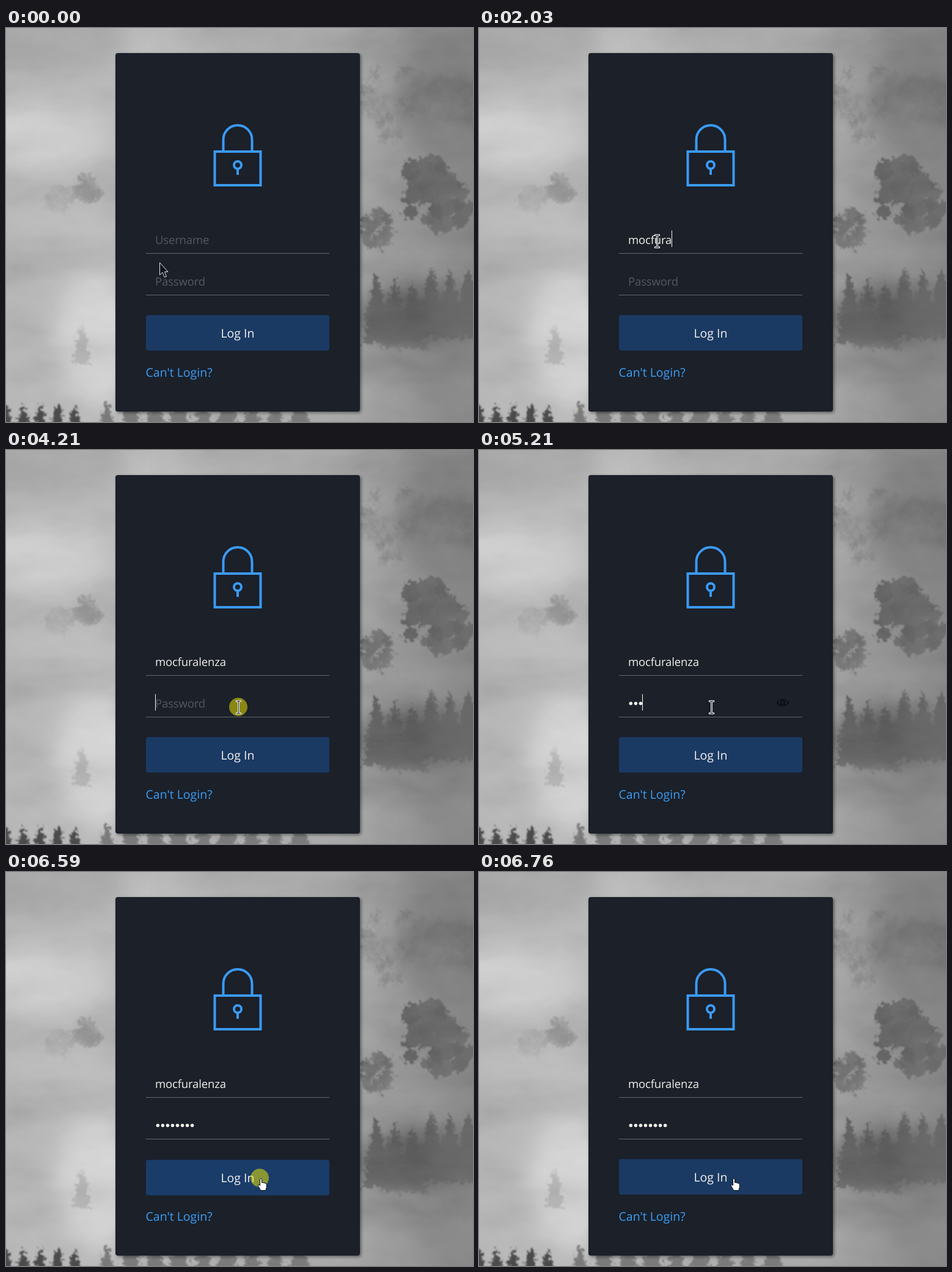
Recreate the animation shown at these times as an HTML page. Size 764 px wide and 644 px high, loop 8000 ms.

```html
<!DOCTYPE html>
<html lang="en">
<head>
<meta charset="utf-8">
<title>Login form</title>
<style>
  html, body { margin: 0; width: 100%; height: 100%; overflow: hidden; background: #aaa; }
  svg { display: block; }
  text { font-family: "Open Sans", "Noto Sans", sans-serif; font-size: 18.5px; letter-spacing: -0.15px; text-rendering: geometricPrecision; }
  .wide { font-size: 19.5px; letter-spacing: 0; }
  .hint { fill: #55595d; }
  .value { fill: #f0efea; white-space: pre; }
</style>
</head>
<body>
<svg id="stage" width="764" height="644" viewBox="0 0 764 644">
  <defs>
    <linearGradient id="sky">
      <stop offset="0" stop-color="#b3b3b3"/>
      <stop offset=".25" stop-color="#bababa"/>
      <stop offset=".75" stop-color="#a0a0a0"/>
      <stop offset="1" stop-color="#7c7c7c"/>
    </linearGradient>
    <filter id="mist" filterUnits="userSpaceOnUse" x="-100" y="-100" width="964" height="844">
      <feGaussianBlur stdDeviation="18"/>
    </filter>
    <filter id="wisps" x="0" y="0" width="100%" height="100%">
      <feTurbulence type="fractalNoise" baseFrequency=".007 .014" numOctaves="4" seed="8"/>
      <feColorMatrix values="1 0 0 0 0  1 0 0 0 0  1 0 0 0 0  0 0 0 0 .16"/>
    </filter>
    <filter id="leaf" filterUnits="userSpaceOnUse" x="-40" y="-40" width="844" height="724">
      <feTurbulence type="fractalNoise" baseFrequency=".14" numOctaves="3" seed="4"/>
      <feDisplacementMap in="SourceGraphic" scale="20" xChannelSelector="R" yChannelSelector="G"/>
      <feGaussianBlur stdDeviation="1"/>
    </filter>
    <filter id="shade" filterUnits="userSpaceOnUse" x="160" y="20" width="440" height="624">
      <feGaussianBlur stdDeviation="2.5"/>
    </filter>
  </defs>

  <rect width="764" height="644" fill="url(#sky)"/>
  <g id="far" filter="url(#mist)"></g>
  <g id="trees" filter="url(#leaf)"></g>
  <g id="near" filter="url(#mist)"></g>
  <rect width="764" height="644" filter="url(#wisps)"/>
  <g id="front" filter="url(#leaf)"></g>

  <rect x="181" y="43" width="400" height="586" rx="4" opacity=".45" filter="url(#shade)"/>
  <rect x="179" y="41" width="400" height="586" rx="4" fill="#1b2029"/>

  <g fill="none" stroke="#3a9af4" stroke-width="4">
    <rect x="341.5" y="202" width="75" height="55"/>
    <path d="M355.5 201V182.500a23.500 23.500 0 0 1 47 0V201"/>
    <circle cx="379" cy="224" r="6"/>
    <path d="M379 229V240"/>
  </g>

  <path d="M229 368.5H529M229 436.5H529" stroke="#696569"/>
  <text id="userHint" class="hint" x="244" y="353">Username</text>
  <text id="user" class="value" x="244" y="353"></text>
  <text id="passHint" class="hint" x="244" y="421">Password</text>
  <g id="dots" fill="#f0efea"></g>
  <g id="eye" fill="none" stroke="#050608" stroke-width="1.2">
    <path d="M487.5 413Q497 402 506.500 413Q497 423 487.500 413Z"/>
    <circle cx="497" cy="412.700" r="3"/>
  </g>
  <rect id="caret" width="1" height="27" fill="#f2f2f2"/>

  <g id="button">
    <rect id="face" x="229" y="469.300" width="300" height="58" rx="4"/>
    <text class="wide" x="379" y="506" text-anchor="middle" fill="#f2f2f0">Log In</text>
  </g>
  <text class="wide" x="228.500" y="570" fill="#3a9ff8">Can't Login?</text>

  <circle id="ring" r="15" fill="#f8ef00" opacity=".5"/>
  <g id="pointer" stroke-linejoin="round">
    <path id="arrow" d="M.5.5V20.500L5 16.500L8.500 24.500L11.500 23L8.500 15.500H14Z" fill="#10141b" stroke="#e8e8e8"/>
    <g id="beam" fill="none">
      <path d="M-4 -9.500H5M.5 -9.500V10.500M-4 10.500H5" stroke="#fff" stroke-width="3"/>
      <path d="M-3 -9.500H4M.5 -9.500V10.500M-3 10.500H4" stroke="#10141b"/>
    </g>
    <path id="hand" d="M.5 2Q2 .2 3.500 2V8Q5 6.500 6.500 8.300Q8 7.200 9.200 9Q11.300 8.500 11.300 11V15.500L9.700 20.500H1.800L-2.600 13Q-3.200 10.500 -1 11L.5 12.500Z" fill="#fff" stroke="#0b0d11"/>
  </g>
</svg>
<script>
const LOOP = 8000, STEP = 77;
const $ = id => document.getElementById(id);
const gray = v => `rgb(${v},${v},${v})`;

let seed = 11;
const rnd = () => (seed = (seed * 16807) % 2147483647) / 2147483647;
const vary = (v, by) => v + (rnd() * 2 - 1) * by;

function add(parent, tag, attrs) {
  const el = document.createElementNS("http://www.w3.org/2000/svg", tag);
  for (const k in attrs) el.setAttribute(k, attrs[k]);
  return $(parent).appendChild(el);
}

// Scenery
const fog = (layer, cx, cy, rx, ry, tone, opacity = 1) =>
  add(layer, "ellipse", { cx, cy, rx, ry, fill: gray(tone), opacity });

function crown(layer, x, y, rx, ry, tone, opacity = 1) {
  for (let i = 0; i < 45; i++) {
    const a = rnd() * Math.PI * 2, d = Math.sqrt(rnd()) * .85;
    add(layer, "circle", {
      cx: x + Math.cos(a) * d * rx, cy: y + Math.sin(a) * d * ry,
      r: Math.min(rx, ry) * vary(.22, .08), fill: gray(Math.round(vary(tone, 6))), opacity
    });
  }
}

function pine(layer, x, y, w, h, tone, opacity = 1) {
  const n = Math.max(5, Math.round(h / 9));
  let left = "", right = "";
  for (let i = 1; i <= n; i++) {
    const at = y + h * i / n;
    const out = w * Math.pow(i / n, .7) * vary(.95, .2);
    right += `L${x + out} ${at}L${x + out * .6} ${at - 2}`;
    left = `L${x - out * .6} ${at - 2}L${x - out} ${at}` + left;
  }
  add(layer, "path", { d: `M${x} ${y}${right}${left}Z`, fill: gray(tone), opacity });
}

function row(layer, n, from, to, y, w, h, tone) {
  for (let i = 0; i < n; i++)
    pine(layer, from + (to - from) * i / (n - 1), vary(y, h * .12), vary(w, w * .15), h, tone);
}

function scenery() {
  fog("far", 50, 175, 120, 55, 208);
  fog("far", 150, 510, 70, 110, 214);
  fog("far", 60, 25, 140, 40, 160);
  fog("far", 740, 110, 100, 110, 116);
  fog("far", 690, 470, 120, 50, 92);

  for (let x = 600; x < 770; x += 28)
    crown("trees", x, vary(130, 25), 24, 48, 108, .18);
  crown("trees", 132, 264, 26, 26, 142, .5);
  crown("trees", 86, 280, 26, 24, 160, .4);
  pine("trees", 124, 486, 20, 65, 172, .7);
  crown("trees", 606, 330, 28, 42, 104, .9);
  crown("trees", 692, 248, 44, 44, 90);
  crown("trees", 708, 288, 66, 48, 94);
  row("trees", 6, 606, 756, 404, 29, 115, 84);

  fog("near", 110, 320, 75, 22, 188, .7);
  fog("near", 690, 362, 80, 18, 138, .7);
  fog("near", 640, 550, 90, 35, 140, .85);
  fog("near", 740, 580, 70, 60, 124, .85);

  row("front", 9, 165, 480, 606, 24, 60, 122);
  row("front", 5, 0, 112, 614, 16, 45, 76);
}

// Form
const NAME = "mocfuralenza";
// Bursts of keys: start, gap, count
const burst = ([start, gap, n]) => Array.from({ length: n }, (_, i) => start + gap * i);
const nameKeys = [[930, 75, 3], [1250, 150, 3], [2030, 150, 2], [2410, 400, 2], [3430, 170, 2]].flatMap(burst);
const passKeys = [[4900, 80, 2], [5210, 150, 2], [5590, 80, 2], [5820, 170, 2]].flatMap(burst);
const moves = [
  { start: 70, steps: 3, x: 291, y: 348, press: 230 },
  { start: 3750, steps: 5, x: 380, y: 420, press: 4060 },
  { start: 6140, steps: 5, x: 415, y: 500, press: 6520 }
];
const HOLD = 155;
const within = (t, a, b) => t >= a && t < b;
const count = (keys, t) => keys.filter(k => k <= t).length;
const ease = p => p * p * (3 - 2 * p);
const show = (el, on) => el.setAttribute("visibility", on ? "visible" : "hidden");
const place = (el, x, y) => el.setAttribute("transform", `translate(${x} ${y})`);

const dots = passKeys.map((_, i) => add("dots", "circle", { cx: 248.3 + i * 8.05, cy: 414.3, r: 2.75 }));

function drawFields(t) {
  const slip = within(t, 2960, 3280) ? "n" : "";
  const name = NAME.slice(0, count(nameKeys, t)) + slip;
  const typed = count(passKeys, t);
  const inPass = t >= 4130;
  $("user").textContent = name;
  show($("userHint"), !name);
  show($("passHint"), !typed);
  dots.forEach((d, i) => show(d, i < typed));
  show($("eye"), within(t, 4900, 6520));

  const nameEnd = 244 + (name ? $("user").getComputedTextLength() : 0);
  const passEnd = typed ? 243 + typed * 8.05 : 244;
  $("caret").setAttribute("x", Math.round(inPass ? passEnd : nameEnd));
  $("caret").setAttribute("y", inPass ? 399 : 331);
  show($("caret"), within(t, 310, 6520) && !within(t, 850, 930) && !within(t, 4670, 4900));
}

function drawPointer(t) {
  let x = 251, y = 383;
  for (const m of moves) {
    if (t < m.start) break;
    const p = ease(Math.min(1, (Math.floor((t - m.start) / STEP) + 1) / m.steps));
    x += Math.round((m.x - x) * p);
    y += Math.round((m.y - y) * p);
  }
  const overField = within(y, 324, 369) || within(y, 392, 437);
  const overButton = within(y, 469, 528);
  place($("pointer"), x, y);
  place($("ring"), x, y);
  show($("beam"), overField);
  show($("hand"), overButton);
  show($("arrow"), !overField && !overButton);
  show($("ring"), moves.some(m => within(t, m.press, m.press + HOLD)));
}

function drawButton(t) {
  const pressed = within(t, 6520, 6760);
  place($("button"), 0, pressed ? 1.2 : 0);
  $("face").setAttribute("fill", pressed ? "#193c69" : "#1b3a63");
}

scenery();
const begin = performance.now();
function tick() {
  const t = (performance.now() - begin) % LOOP;
  drawFields(t);
  drawPointer(t);
  drawButton(t);
  requestAnimationFrame(tick);
}
tick();
</script>
</body>
</html>
```
